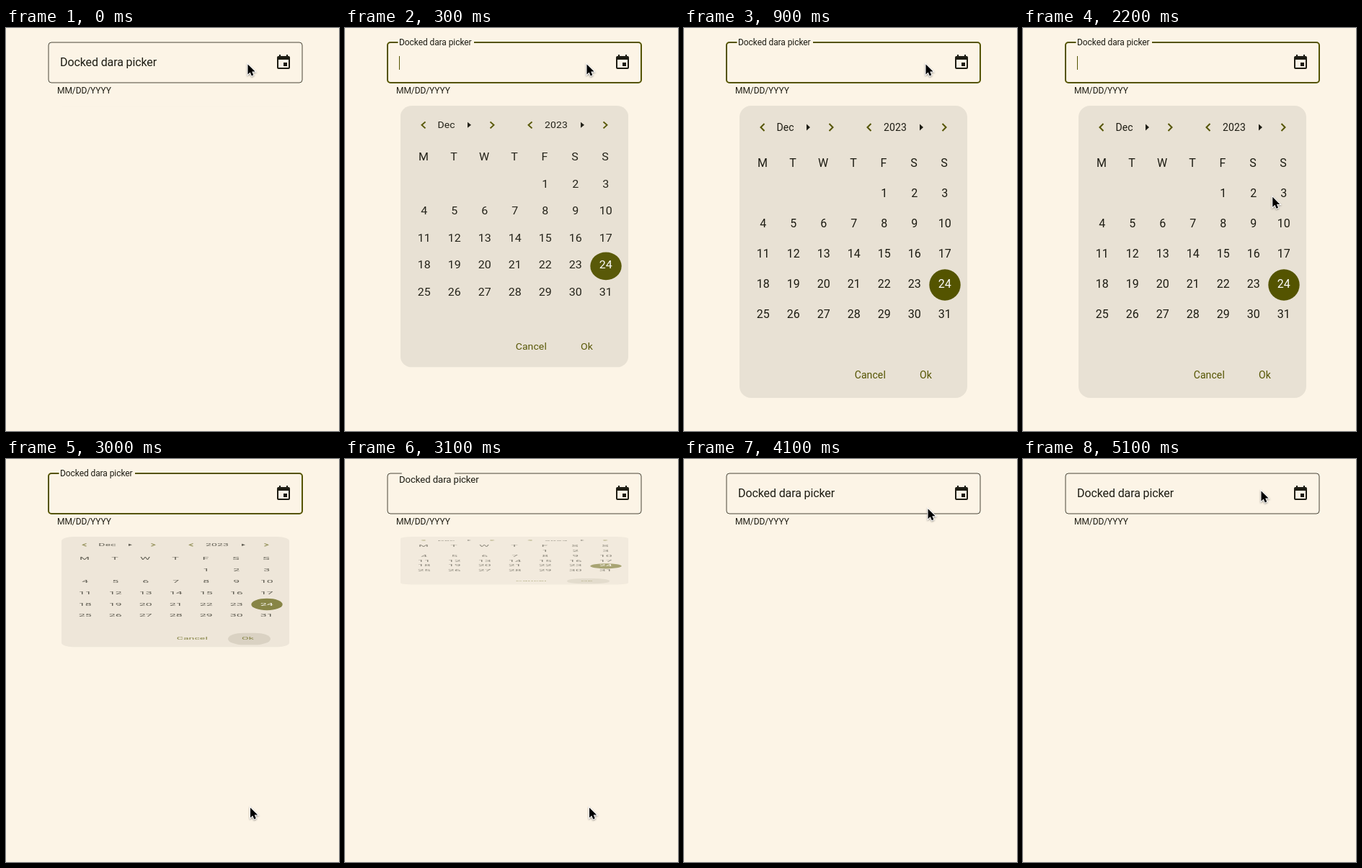
Write an HTML page that moves like this. It is 462 px wide and 560 px high and loops after 5.2 s.

```html
<!DOCTYPE html>
<html lang="en">
<head>
<meta charset="utf-8">
<title>Docked date picker</title>
<style>
  html, body { margin: 0; width: 100%; height: 100%; overflow: hidden; background: #fcf4e6; }
  svg { display: block; width: 100%; height: 100%; font-family: Roboto, sans-serif; fill: #1d1c13; }
  .field { letter-spacing: -.007em; }
  .small { font-size: 14px; letter-spacing: .1px; text-anchor: middle; }
  .day { font-size: 16px; text-anchor: middle; }
  .accent { fill: #545400; }
  .chevron { fill: none; stroke: #545400; stroke-width: 2; }
</style>
</head>
<body>
<svg viewBox="0 0 462 560">
  <rect id="border" x="59" y="20" width="352" height="56" rx="4" fill="none"/>
  <rect id="notch" y="18" height="4" fill="#fcf4e6"/>
  <text id="label" class="field" x="75">Docked dara picker</text>
  <path id="caret" d="M75.5 39v19" stroke="#545400"/>
  <text class="field" x="71" y="91" font-size="12">MM/DD/YYYY</text>
  <path transform="translate(373 36)" d="M17 12h-5v5h5zM16 1v2H8V1H6v2H5a2 2 0 0 0-2 2v14a2 2 0 0 0 2 2h14a2 2 0 0 0 2-2V5a2 2 0 0 0-2-2h-1V1zm3 18H5V8h14z"/>
  <g id="panel">
    <rect x="77" y="108" width="316" height="406" rx="16" fill="#e8e1d4"/>
    <g id="header"></g>
    <circle class="accent" cx="362" cy="357" r="21.7"/>
    <g id="days"></g>
    <rect id="hover" x="308" y="462" width="59" height="44" rx="22" fill="#3c3a18" fill-opacity=".17"/>
    <text class="small accent" x="258.3" y="487">Cancel</text>
    <text class="small accent" x="335.5" y="487">Ok</text>
  </g>
  <path id="cursor" d="M0 0V14l3.2-3 2.1 4.9 2.5-1.1-2.1-4.7h4.4z" fill="#000" stroke="#fff" stroke-width="2"
    paint-order="stroke" style="filter: drop-shadow(0 1px 1px #0006)"/>
</svg>
<script>
const LOOP = 5200;
const el = id => document.getElementById(id);
const set = (id, attrs) => { for (const k in attrs) el(id).setAttribute(k, attrs[k]); };
const clamp = v => Math.min(1, Math.max(0, v));
const phase = (t, start, length) => clamp((t - start) / length);
const lerp = (a, b, p) => a + (b - a) * p;
const easeOut = p => 1 - (1 - p) ** 3;
const smooth = p => p * p * (3 - 2 * p);

function buildPanel() {
  const chevron = (x, dir) => `<path class="chevron" d="M${x - 2.5 * dir} 133l${5 * dir} 5l${-5 * dir} 5"/>`;
  const group = (text, left, middle, arrow, right) =>
    chevron(left, -1) + `<text class="small" x="${middle}" y="143">${text}</text>` +
    `<path d="M${arrow} 133.5l5 4.5-5 4.5z"/>` + chevron(right, 1);
  el('header').innerHTML = group('Dec', 109, 140.5, 170, 204) + group('2023', 257, 293, 327, 361);

  const cell = (text, x, y, fill = '') => `<text class="day" x="${x}" y="${y}" ${fill}>${text}</text>`;
  let cells = [...'MTWTFSS'].map((name, i) => cell(name, 109 + 42 * i, 193)).join('');
  for (let day = 1; day <= 31; day++) {
    const slot = day + 3;
    cells += cell(day, 109.8 + 42 * (slot % 7), 235 + 42 * Math.floor(slot / 7), day === 24 ? 'fill="#fff"' : '');
  }
  el('days').innerHTML = cells;
}

// Each move: start time, from, to, sideways bulge of the path
const moves = [
  [2100, [335, 50], [338.5, 484], 9.5],
  [3400, [338.5, 484], [344, 87], 13],
  [4000, [344, 87], [330, 44], 0]
];

function cursorAt(t) {
  const [start, from, to, bulge] = moves.findLast(m => t >= m[0]) || moves[0];
  const p = easeOut(phase(t, start, 600));
  return [lerp(from[0], to[0], p) + bulge * 4 * p * (1 - p), lerp(from[1], to[1], p)];
}

function draw(t) {
  const focused = t >= 60 && t < 3050;
  const float = smooth(phase(t, 60, 150)) - smooth(phase(t, 3046, 150));
  set('border', { stroke: focused ? '#545400' : '#4a4639', 'stroke-width': focused ? 2 : 1 });
  const left = lerp(91, 73.5, float);
  set('notch', { x: left, width: lerp(91, 179, float) - left });
  set('label', { y: lerp(53, 24, float), 'font-size': lerp(16, 12, float) });
  const caretOn = t >= 100 && t < 2800 && (t < 200 || Math.floor((t - 200) / 500) % 2 === 0);
  set('caret', { opacity: caretOn ? 1 : 0 });

  const opening = phase(t, 0, 570), closing = phase(t, 2843, 570);
  const scale = easeOut(opening) - easeOut(closing);
  set('panel', {
    transform: `translate(0 108) scale(1 ${scale}) translate(0 -108)`,
    opacity: clamp(opening * 1.83) * clamp(1 - closing * 1.12)
  });

  const [x, y] = cursorAt(t);
  set('hover', { opacity: y > 462 ? 1 : 0 });
  set('cursor', { transform: `translate(${x + .5} ${y + .5})` });
}

function frame() {
  draw(performance.now() % LOOP);
  requestAnimationFrame(frame);
}

buildPanel();
frame();
</script>
</body>
</html>
```
